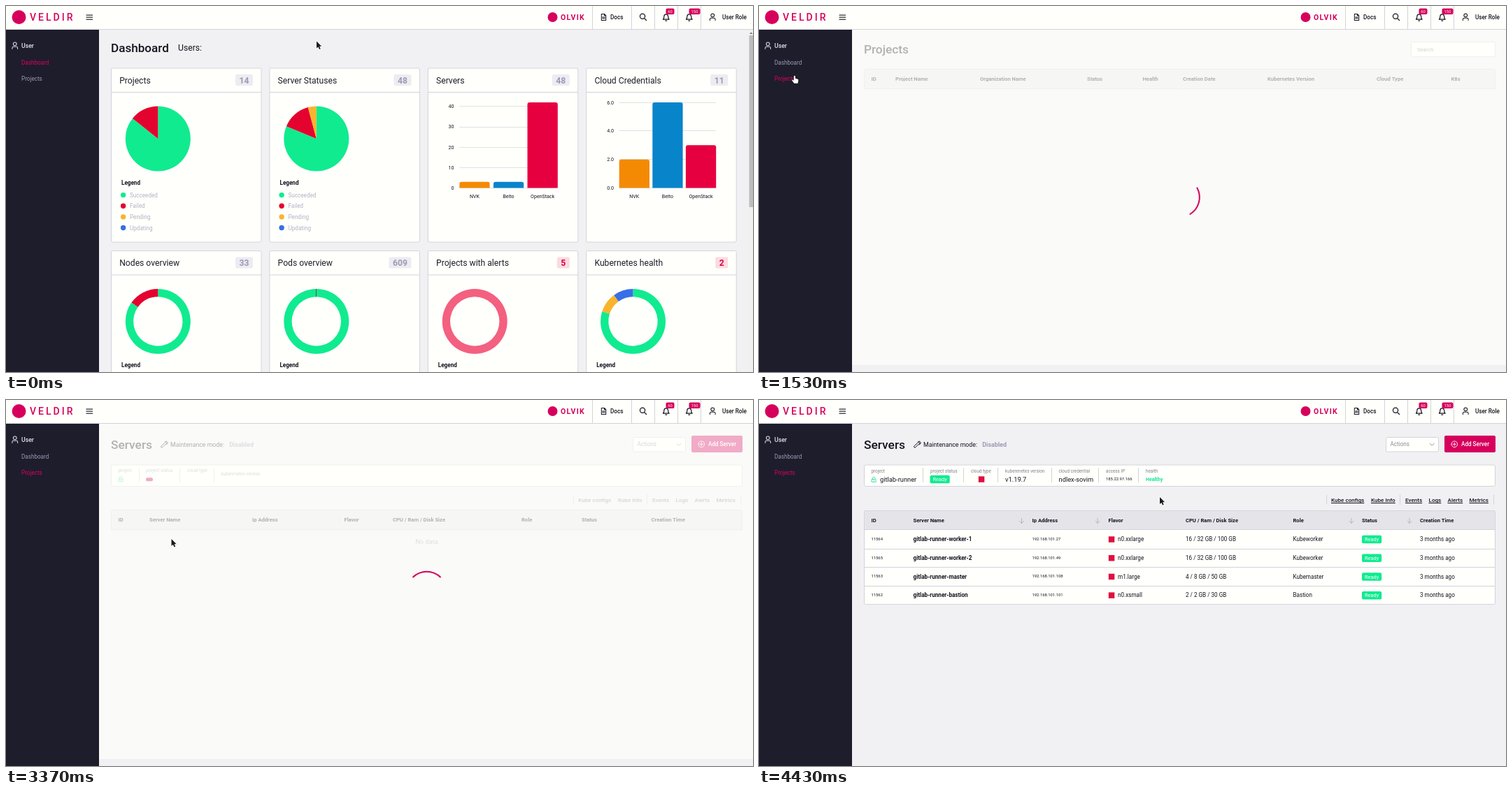
These frames come from a looping animation (1068 by 524 pixels, 5.71 s). An HTML page with a canvas:

```html
<!DOCTYPE html>
<html lang="en">
<head>
<meta charset="utf-8">
<title>Cluster console</title>
<style>
html, body { margin: 0; width: 100%; height: 100%; overflow: hidden; background: #f1f1f4; }
canvas { display: block; }
</style>
</head>
<body>
<canvas id="stage" width="1068" height="524"></canvas>
<script>
const ctx = document.getElementById('stage').getContext('2d');
const LOOP = 5710;
const PAGE = '#f1f1f4', WHITE = '#fffffc', INK = '#14141f', LINE = '#d3d3db', MUTED = '#9c9bb3';
const BRAND = '#d6005c', GREEN = '#10eb90', RED = '#e4032e', AMBER = '#f8b42c', BLUE = '#386fe6';
const NAVY = '#1e1d2c';

// ---- helpers ----
// y is the middle of the capital letters
function text(s, x, y, size = 8.15, color = INK, weight = 400, align = 'left') {
  ctx.font = `${weight} ${size}px Roboto, sans-serif`;
  ctx.textAlign = align;
  ctx.fillStyle = color;
  ctx.fillText(s, x, y + size * 0.355);
}
function rect(x, y, w, h, color) {
  ctx.fillStyle = color;
  ctx.fillRect(x, y, w, h);
}
function box(x, y, w, h, r, fill, border) {
  ctx.beginPath();
  ctx.roundRect(x, y, w, h, r);
  if (fill) { ctx.fillStyle = fill; ctx.fill(); }
  if (border) { ctx.strokeStyle = border; ctx.lineWidth = 1; ctx.stroke(); }
}
function dot(x, y, r, color) {
  ctx.beginPath();
  ctx.arc(x, y, r, 0, Math.PI * 2);
  ctx.fillStyle = color;
  ctx.fill();
}
function icon(path, x, y, size, color = INK, width = 2.2) {
  ctx.save();
  ctx.translate(x, y);
  ctx.scale(size / 24, size / 24);
  ctx.strokeStyle = color;
  ctx.lineWidth = width;
  ctx.lineCap = ctx.lineJoin = 'round';
  ctx.stroke(new Path2D(path));
  ctx.restore();
}
const vline = (x, y, h, color = LINE) => rect(x, y, 1, h, color);
const hline = (x, y, w, color = LINE) => rect(x, y, w, 1, color);

const ICON = {
  user: 'M4 22v-3a4 4 0 0 1 4-4h8a4 4 0 0 1 4 4v3M7 7a5 5 0 1 0 10 0a5 5 0 1 0-10 0',
  doc: 'M14 2H5v20h14V7zM14 2v5h5M8 12h8M8 16h8',
  search: 'M3 10a7.500 7.500 0 1 0 15 0a7.500 7.500 0 1 0-15 0M16 16l6 6',
  bell: 'M18 9a6 6 0 0 0-12 0c0 7-3 9-3 9h18s-3-2-3-9M10 22h4',
  wrench: 'M14 7a6 6 0 0 1 8-4l-4 4 1 2 2 1 3-4a6 6 0 0 1-8 7l-8 9a3 3 0 0 1-5-4l9-8z',
  lock: 'M4 11h16v11H4zM7 11V7a5 5 0 0 1 10 0M12 15v3',
  down: 'M12 3v18M4 13l8 8 8-8',
  chevron: 'M4 8l8 8 8-8',
  plus: 'M2 12a10 10 0 1 0 20 0a10 10 0 1 0-20 0M12 7v10M7 12h10'
};

// ---- frame of the application ----
function topBar() {
  rect(0, 0, 1068, 33, WHITE);
  hline(0, 33, 1068);
  dot(18.5, 16, 10, BRAND);
  ctx.letterSpacing = '3px';
  text('VELDIR', 34, 16.3, 14, BRAND, 500);
  ctx.letterSpacing = '1.3px';
  dot(781.5, 16, 7, BRAND);
  text('OLVIK', 793, 16.2, 10.5, BRAND, 700);
  ctx.letterSpacing = '0px';
  for (const y of [12.5, 15.6, 18.7]) rect(114.5, y, 9.5, 1.1, INK);
  for (const x of [838, 894, 927, 960, 993]) vline(x, 0, 33);
  icon(ICON.doc, 849, 10.5, 11);
  text('Docs', 864, 16.2, 8.15, INK, 500);
  icon(ICON.search, 905, 10, 11.5, INK, 2.6);
  for (const [x, n, w] of [[938, '60', 12], [971, '150', 16]]) {
    icon(ICON.bell, x, 10.5, 11.5, INK, 2.6);
    box(x + 5.5, 3.5, w, 8.5, 2, BRAND);
    text(n, x + 5.5 + w / 2, 7.8, 5.8, '#fff', 400, 'center');
  }
  icon(ICON.user, 1004.5, 10, 11.5);
  text('User Role', 1024, 16.2, 8.15, INK, 500);
}
function sideBar(dashboardOn, projectsOn) {
  rect(0, 34, 133, 490, NAVY);
  icon(ICON.user, 7, 51, 11.5, '#d9d9e2');
  text('User', 22, 57.3, 8.73, '#e4e4ec', 500);
  text('Dashboard', 22, 80.8, 8.15, dashboardOn ? '#dc0062' : MUTED);
  text('Projects', 22, 104, 8.15, projectsOn ? '#dc0062' : MUTED);
}

// ---- dashboard ----
function wedge(cx, cy, r, hole, parts) {
  const total = parts.reduce((sum, p) => sum + p[0], 0);
  let a = -Math.PI / 2;
  for (const [n, color] of parts) {
    const b = a + n / total * Math.PI * 2;
    ctx.beginPath();
    ctx.arc(cx, cy, r, a, b);
    if (hole) ctx.arc(cx, cy, hole, b, a, true);
    else ctx.lineTo(cx, cy);
    ctx.fillStyle = color;
    ctx.fill();
    a = b;
  }
}
function card(col, row, title, count, alert) {
  const x = 150.5 + col * 226.4, y = row ? 350.5 : 89, right = x + 214.5;
  box(x, y, 214.5, 249, 2, WHITE, LINE);
  hline(x, y + 34, 214.5);
  text(title, x + 11.7, y + 17.3, 12.15, '#1d1d28');
  ctx.font = '700 12.15px Roboto, sans-serif';
  const w = ctx.measureText(count).width + 11;
  box(right - 12 - w, y + 9, w, 16, 2, alert ? '#fbdbe3' : '#ececf2');
  text(count, right - 12 - w / 2, y + 17.3, 12.15, alert ? '#dc0242' : MUTED, 700, 'center');
}
function legend(x) {
  text('Legend', x, 253, 8.15, INK, 700);
  [['Succeeded', GREEN], ['Failed', RED], ['Pending', AMBER], ['Updating', BLUE]].forEach(([s, c], i) => {
    const y = 270.6 + i * 15.65;
    dot(x + 2.6, y, 3.7, c);
    text(s, x + 12, y + 0.3, 8.15, '#b3b2c5');
  });
}
function bars(x, labelX, width, step, ticks, unit, values) {
  ticks.forEach((s, i) => {
    const y = 260 - i * step;
    hline(x, Math.round(y), width, '#e1e1e4');
    text(s, labelX, y + 0.4, 7.1, INK, 400, 'right');
  });
  const pitch = (width - 43.3) / 2;
  values.forEach(([label, n, color], i) => {
    const left = x + i * pitch, h = n * unit;
    box(left, 260.5 - h, 43.3, h, [3, 3, 0, 0], color);
    text(label, left + 21.6, 272.3, 7.05, INK, 400, 'center');
  });
}
function dashboard() {
  text('Dashboard', 150, 60, 17.1, INK, 500);
  text('Users:', 246, 60, 12.2);
  card(0, 0, 'Projects', '14');
  card(1, 0, 'Server Statuses', '48');
  card(2, 0, 'Servers', '48');
  card(3, 0, 'Cloud Credentials', '11');
  card(0, 1, 'Nodes overview', '33');
  card(1, 1, 'Pods overview', '609');
  card(2, 1, 'Projects with alerts', '5', true);
  card(3, 1, 'Kubernetes health', '2', true);

  wedge(217.3, 190, 46.5, 0, [[12, GREEN], [2, RED]]);
  wedge(443.8, 190, 46.5, 0, [[39, GREEN], [7, RED], [2, AMBER]]);
  legend(165);
  legend(391.5);
  const clouds = (a, b, c) => [['NVK', a, '#f48a04'], ['Belto', b, '#0884cb'], ['OpenStack', c, '#e7003f']];
  bars(648.3, 640.5, 140.5, 29.15, ['0', '10', '20', '30', '40'], 2.915, clouds(3, 3, 42));
  bars(876.7, 869, 138.5, 40.8, ['0.0', '2.0', '4.0', '6.0'], 20.4, clouds(2, 6, 3));

  wedge(217.3, 451.5, 46.5, 35.2, [[28, GREEN], [5, RED]]);
  wedge(443.8, 451.5, 46.5, 35.2, [[1, GREEN]]);
  rect(443, 405, 1, 11.5, '#81453d');
  wedge(670.2, 451.5, 46.5, 35.2, [[1, '#f4607f']]);
  wedge(896.5, 451.5, 46.5, 35.2, [[8, GREEN], [1, AMBER], [1, BLUE]]);
  for (let i = 0; i < 4; i++) text('Legend', 165 + i * 226.4, 514.3, 8.15, INK, 700);

  rect(1062, 34, 6, 490, '#f0f0f1');
  rect(1062.5, 42, 5.5, 246, '#bdbdbf');
  ctx.beginPath();
  ctx.moveTo(1063, 40); ctx.lineTo(1065.3, 37.5); ctx.lineTo(1067.6, 40);
  ctx.fillStyle = '#77777c';
  ctx.fill();
}

// ---- tables ----
function tableHead(y, h, titles, xs, arrows) {
  box(150.5, y, 902, h, [2, 2, 0, 0], '#e5e5e9', LINE);
  titles.forEach((s, i) => text(s, xs[i], y + 13.8, 7.6, INK, 700));
  for (const x of arrows) icon(ICON.down, x - 4.5, y + 10, 9, '#aaaab4');
}
function badge(s, x, y, color, size = 7.4) {
  ctx.font = `400 ${size}px Roboto, sans-serif`;
  box(x, y - 5.5, ctx.measureText(s).width + 8, 11.5, 2, color);
  text(s, x + 4, y + 0.2, size, '#fff');
}
const square = (x, y) => rect(x, y - 4, 8.5, 8.5, '#e0103f');

const PROJECT_HEAD = ['ID', 'Project Name', 'Organization Name', 'Status', 'Health', 'Creation Date',
  'Kubernetes Version', 'Cloud Type', 'K8s'];
const PROJECTS = [
  ['65', 'openstack-test', 'Warning', '6 months', '18.10'],
  ['105', 'domel', 'Healthy', '5 months', '19.9'],
  ['270', 'gitlab-runner', 'Healthy', '3 months', '19.7'],
  ['627', 'rokan', 'Unknown', '1 month', '19.9'],
  ['921', 'velero-test', 'Healthy', '3 weeks', '19.9'],
  ['932', 'belfin', 'Healthy', '3 weeks', '19.9'],
  ['950', 'upgrade', 'None', '2 weeks', '18.10']
];
const HEALTH = { Healthy: '#14e293', Warning: '#f3b02c' };

function projectsTop() {
  text('Projects', 150, 62, 17.3, INK, 500);
  box(932.5, 51.5, 120, 21, 2, WHITE, LINE);
  text('Search', 941, 62, 7.6, '#77777d');
}
function projectsLoading() {
  projectsTop();
  tableHead(90.5, 28, PROJECT_HEAD, [160.5, 195, 316, 469, 548.5, 606, 727, 883, 989.5], []);
}
function projects(iconsReady) {
  projectsTop();
  box(150.5, 90.5, 902, 250, 2, WHITE, LINE);
  tableHead(90.5, 27, PROJECT_HEAD, [160.5, 214.5, 329.5, 474.5, 550.5, 624, 739, 886.5, 988],
    iconsReady ? [314, 460, 535, 723.5, 871, 972.5] : []);
  vline(1029, 118, 222);
  PROJECTS.forEach(([id, name, health, age, version], i) => {
    const y = 133.6 + i * 31.88;
    if (i) hline(151, Math.round(y - 16), 878);
    text(id, 160.5, y - 0.3, 5.85);
    text(name, 214.5, y, 8.15, INK, 700);
    text('olvik', 329.5, y, 8.15, INK, 700);
    const failed = id === '932';
    badge(failed ? 'Failure' : 'Ready', 475, y, failed ? RED : GREEN);
    text(health, 550.5, y, 8.15, HEALTH[health] || INK, 700);
    text(age + ' ago', 624, y);
    badge('v1.' + version, 739, y, BRAND, 7.6);
    square(886.8, y);
    text('OPENSTACK', 900, y, 6.45);
    dot(996.8, y + 0.6, 4.2, health === 'None' ? '#c6c6ca' : '#6b6b73');
  });
  text('Results: 1 - 7 of 7', 150, 363.3);
  text('Page Size:', 227, 363.3);
  box(269.5, 352.5, 39, 21, 2, WHITE, LINE);
  text('50', 275, 363.3);
  if (iconsReady) {
    ctx.beginPath();
    ctx.moveTo(294.5, 361.5); ctx.lineTo(300.5, 361.5); ctx.lineTo(297.5, 365);
    ctx.fillStyle = '#5b5b63';
    ctx.fill();
  }
}

const SERVER_HEAD = ['ID', 'Server Name', 'Ip Address', 'Flavor', 'CPU / Ram / Disk Size', 'Role', 'Status', 'Creation Time'];
const SERVERS = [
  ['11564', 'worker-1', '27', 'n0.xxlarge', '16 / 32 GB / 100 GB', 'Kubeworker'],
  ['11565', 'worker-2', '49', 'n0.xxlarge', '16 / 32 GB / 100 GB', 'Kubeworker'],
  ['11563', 'master', '108', 'm1.large', '4 / 8 GB / 50 GB', 'Kubemaster'],
  ['11562', 'bastion', '101', 'n0.xsmall', '2 / 2 GB / 30 GB', 'Bastion']
];

function serversTop(underline) {
  text('Servers', 150, 63.5, 17.4, INK, 500);
  icon(ICON.wrench, 220.5, 58, 10.5);
  text('Maintenance mode:', 235, 63.5, 8.75);
  text('Disabled', 319.3, 63.5, 8.9, MUTED, 700);
  box(896.5, 53.5, 75, 20.5, 2, WHITE, LINE);
  text('Actions', 902.5, 63.5, 8.15, '#8c8c98');
  icon(ICON.chevron, 958, 59.5, 8.5, '#77777f');
  box(980, 51, 73, 24, 2, BRAND);
  icon(ICON.plus, 989, 58, 10.5, '#fff', 2);
  text('Add Server', 1004, 63.5, 8.15, '#fff', 500);
  box(150.5, 93, 902, 30.5, 2, WHITE, LINE);
  const links = [['Kube configs', 818], ['Kube Info', 875], ['Events', 924], ['Logs', 957.5], ['Alerts', 984.5], ['Metrics', 1015.5]];
  for (const [s, x] of links) {
    text(s, x, 142.7, 8.1, underline ? INK : '#85858f', 500);
    if (underline) hline(x, 147, ctx.measureText(s).width, INK);
  }
  for (const x of [811, 916, 1050]) vline(x, 135.5, 14);
}
function serversLoading(iconsReady) {
  serversTop(false);
  const label = '#9a9aa4';
  text('project', 160.5, 101, 6.3, label);
  text('project status', 200, 101, 6.3, label);
  text('cloud type', 259, 101, 6.3, label);
  text('kuberenetes version', 307.5, 106, 6.3, label);
  for (const x of [190, 248, 297]) vline(x, 97, 21);
  icon(ICON.lock, 160, 109, 8.5, '#16d98d');
  box(200, 111.2, 10, 5, 2, BRAND);
  tableHead(157.5, 28.5, SERVER_HEAD, [160.5, 205, 352, 483.5, 553, 737, 823, 922.5],
    iconsReady ? [337, 468, 808, 907] : []);
  text('No data', 601.5, 202.3, 9.3, '#a2a2ac', 400, 'center');
}
function servers() {
  serversTop(true);
  const labels = [['project', 160.5], ['project status', 245], ['cloud type', 303], ['kuberenetes version', 352],
    ['cloud credential', 428.5], ['access IP', 496], ['health', 553]];
  for (const [s, x] of labels) text(s, x, 101.5, 6.3, '#82828c');
  for (const x of [234, 292, 341, 418, 485, 542]) vline(x, 97, 21);
  icon(ICON.lock, 160, 109.5, 8.5, '#16d98d');
  text('gitlab-runner', 173, 113.6, 9.3);
  badge('Ready', 244.5, 113.3, GREEN);
  square(313.8, 113.3);
  text('v1.19.7', 352, 113.6, 9.3);
  text('ndlex-sovim', 428.5, 113.6, 9.3);
  text('185.22.97.166', 496, 113.3, 5.85);
  text('Healthy', 553, 114, 7, HEALTH.Healthy, 700);

  box(150.5, 158.5, 902, 134, 2, WHITE, LINE);
  tableHead(158.5, 27, SERVER_HEAD, [160.5, 220.5, 390.5, 499.5, 610, 763.5, 862, 945], [375.5, 484, 847, 930]);
  SERVERS.forEach(([id, name, ip, flavor, size, role], i) => {
    const y = 199.3 + i * 26.7;
    if (i) hline(151, Math.round(y - 13.5), 901);
    text(id, 160.5, y - 0.3, 5.85);
    text('gitlab-runner-' + name, 220.5, y, 8.15, INK, 700);
    text('192.168.101.' + ip, 390.5, y - 0.3, 5.85);
    square(499.8, y);
    text(flavor, 513, y);
    text(size, 610, y);
    text(role, 763.5, y);
    badge('Ready', 862, y, GREEN);
    text('3 months ago', 945, y);
  });
}

// ---- loading veil ----
function veil(turn) {
  rect(133, 34, 935, 480, 'rgba(255,255,251,.67)');
  const mid = -Math.PI / 2 + turn * Math.PI * 2;
  ctx.beginPath();
  ctx.arc(601.5, 274, 28.3, mid - Math.PI / 4, mid + Math.PI / 4);
  ctx.strokeStyle = BRAND;
  ctx.lineWidth = 2;
  ctx.lineCap = 'butt';
  ctx.stroke();
}
const ticked = (ms, step) => Math.floor((ms + 0.01) / step) * step / 800;

// ---- pointer: time, x, y, hand? ----
const POINTER = [
  [0, 444, 50.5], [400, 442, 51], [630, 380, 57], [730, 235, 76], [830, 110, 94], [930, 51, 99.5, 1],
  [2130, 60, 105, 1], [2200, 76, 111, 1], [2260, 98, 119, 1], [2330, 126, 126, 1], [2400, 158, 150],
  [2470, 192, 188], [2500, 213, 195, 1], [2600, 242, 200, 1], [2700, 256, 201, 1], [2870, 224, 200, 1],
  [2930, 237, 199.5, 1], [3370, 236.5, 199]
];
const GLIDE = [[3900, 236.5, 199], [4170, 410.5, 178], [4430, 573, 139]];

function pointerAt(t) {
  if (t < GLIDE[0][0]) return POINTER.findLast(p => p[0] <= t);
  const i = t < GLIDE[1][0] ? 0 : 1;
  const [a, b] = [GLIDE[i], GLIDE[i + 1]];
  const k = Math.min(1, (t - a[0]) / (b[0] - a[0]));
  return [t, a[1] + (b[1] - a[1]) * k, a[2] + (b[2] - a[2]) * k];
}
const ARROW = new Path2D('M0 0V10L2.300 8L4 11.500L5.700 10.700L4.100 7.300H7.200Z');
const HAND = new Path2D('M-1.200 1Q0-.6 1 1V4.300L4.600 5.200Q5.500 5.600 5.300 7L4.500 11.300H-.8L-3.800 7.300Q-3.900 5.600-2.500 6.200L-1.200 7.300Z');
function pointer(t) {
  const [, x, y, hand] = pointerAt(t);
  ctx.save();
  ctx.translate(x, y);
  ctx.lineJoin = 'round';
  const shape = hand ? HAND : ARROW;
  ctx.strokeStyle = hand ? '#111' : '#fff';
  ctx.lineWidth = hand ? 1.1 : 1.2;
  ctx.stroke(shape);
  ctx.fillStyle = hand ? '#fff' : '#1b1b1f';
  ctx.fill(shape);
  ctx.restore();
}

function draw(t) {
  rect(0, 0, 1068, 524, PAGE);
  if (t < 1330) dashboard();
  else if (t < 1730) {
    projectsLoading();
    veil(ticked(t - 1330, 40) + 15 / 360);
  } else if (t < 3370) projects(t >= 1900);
  else if (t < 4430) {
    serversLoading(t >= 3700);
    veil(ticked(t - 3370, 100 / 3));
  } else servers();
  topBar();
  sideBar(t < 1330, t >= 930);
  pointer(t);
}

const start = performance.now();
function tick() {
  draw((performance.now() - start) % LOOP);
  requestAnimationFrame(tick);
}
tick();
</script>
</body>
</html>
```
